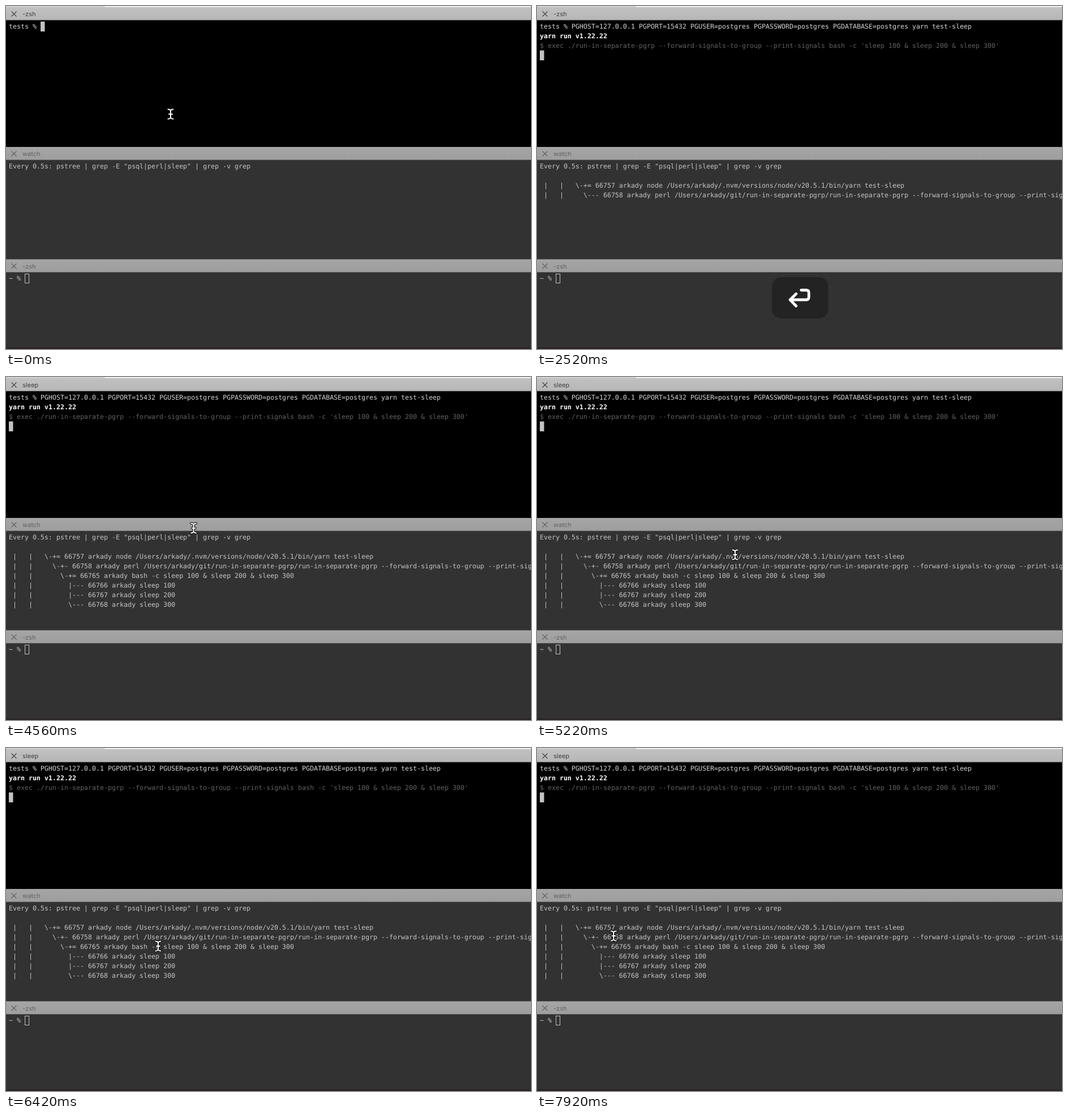
These frames come from a looping animation (925x606 px, 8 s). An HTML page:

```html
<!DOCTYPE html>
<html lang="en">
<head>
<meta charset="utf-8">
<title>Terminal panes</title>
<style>
  html, body { margin: 0; width: 100%; height: 100%; overflow: hidden; background: #323232; }
  svg { display: block; width: 925px; height: 606px; }
  text { white-space: pre; text-rendering: geometricPrecision; }
  .mono { font: 11.6px "DejaVu Sans Mono", "Noto Sans Mono", monospace; }
  .title { font: 11px Inter, Roboto, sans-serif; }
  .icon { fill: none; stroke: #fff; stroke-width: 4.8; stroke-linecap: round; stroke-linejoin: round; }
</style>
</head>
<body>
<svg viewBox="0 0 925 606">
  <defs>
    <linearGradient id="active" x2="0" y2="1"><stop stop-color="#c1c1c1"/><stop offset="1" stop-color="#b6b6b6"/></linearGradient>
    <linearGradient id="idle" x2="0" y2="1"><stop stop-color="#a5a5a5"/><stop offset="1" stop-color="#9e9e9e"/></linearGradient>
    <path id="beam" d="M-4.5-8.5Q-1-8.5 0-6Q1-8.5 4.5-8.5M0-6V6M-4.5 8.5Q-1 8.5 0 6Q1 8.5 4.5 8.5M-3 0H3"/>
  </defs>
  <rect width="925" height="606" fill="#323232"/>
  <rect width="925" height="2" fill="#f1f1f1"/>
  <rect width="174" height="2" fill="#d2d2d2"/>
  <rect y="25" width="925" height="224" fill="#000"/>
  <rect y="603" width="925" height="3" fill="#2b2528"/>
  <g id="bars"></g>
  <g id="rows"></g>
  <rect id="block" width="7.5" height="17.5" fill="#c2c2c2"/>
  <rect x="33.5" y="473.5" width="7" height="16" fill="none" stroke="#c2c2c2"/>
  <g id="up">
    <rect x="418.5" y="479" width="89" height="73" rx="16" fill="#232323"/>
    <path class="icon" d="M462.5 531.5V503M450.5 514.5L462.5 502.5L474.5 514.5"/>
  </g>
  <g id="enter">
    <rect x="414" y="479" width="99" height="73" rx="16" fill="#232323"/>
    <path class="icon" d="M465.5 502H474.5Q479 502 479 506.5V514Q479 519 474.5 519H446.5M456.5 508.5L446 519L456.5 530"/>
  </g>
  <g id="mouse" fill="none" stroke-linecap="round">
    <use href="#beam" stroke="#000" stroke-width="4"/>
    <use href="#beam" stroke="#fff" stroke-width="2"/>
  </g>
</svg>
<script>
const LOOP = 8000, STEP = 60, CELL = 6.984, LINE = 17;
// Moments of the session, in ms
const RECALL = 1440, RETURN = 2160, OUTPUT = 2340, SPAWN = 2460, TREE = 2940, FADE = 3060, GONE = 3540, MOVE = 3900;

const $ = id => document.getElementById(id);
const NS = "http://www.w3.org/2000/svg";

function add(parent, tag, attrs, text = "") {
  const el = document.createElementNS(NS, tag);
  for (const key in attrs) el.setAttribute(key, attrs[key]);
  el.textContent = text;
  return parent.appendChild(el);
}

function bar(y, name, fill, ink) {
  const g = $("bars");
  add(g, "rect", { y, width: 925, height: 23, fill: `url(#${fill})` });
  add(g, "path", { d: `M0 ${y + 23}H925`, stroke: "#555", "stroke-width": 0.7 });
  add(g, "path", { d: `M9.5 ${y + 7.5}l9 9m0-9l-9 9`, stroke: ink, "stroke-width": 1.1 });
  return add(g, "text", { x: 29, y: y + 16, class: "title", fill: ink }, name);
}

const title = bar(2, "-zsh", "active", "#414141");
bar(249, "watch", "idle", "#626262");
bar(447.5, "-zsh", "idle", "#626262");

// Each row is visible from one moment until another
const rows = [];
function row(top, n, text, from = 0, to = LOOP, fill = "#c4c4c4", weight = 400) {
  const el = add($("rows"), "text", { x: 5, y: top + n * LINE, class: "mono", fill }, text);
  el.style.fontWeight = weight;
  rows.push({ el, from, to });
}

const prompt = "tests % ";
const command = "PGHOST=127.0.0.1 PGPORT=15432 PGUSER=postgres PGPASSWORD=postgres PGDATABASE=postgres yarn test-sleep";
const user = "arkady";
const pipes = " |   |   ";
const perl = ` 66758 ${user} perl /Users/${user}/git/run-in-separate-pgrp/run-in-separate-pgrp --forward-signals-to-group --print-signals`;

row(40, 0, prompt, 0, LOOP, "#d6d6d6");
row(40, 0, " ".repeat(prompt.length) + command, RECALL, LOOP, "#d6d6d6");
row(40, 1, "yarn run v1.22.22", OUTPUT, LOOP, "#fff", 700);
row(40, 2, "$ exec ./run-in-separate-pgrp --forward-signals-to-group --print-signals bash -c 'sleep 100 & sleep 200 & sleep 300'", OUTPUT, LOOP, "#626262");

row(287, 0, 'Every 0.5s: pstree | grep -E "psql|perl|sleep" | grep -v grep');
row(287, 2, `${pipes}\\-+= 66757 ${user} node /Users/${user}/.nvm/versions/node/v20.5.1/bin/yarn test-sleep`, SPAWN);
row(287, 3, `${pipes}  \\---${perl}`, SPAWN, TREE);
row(287, 3, `${pipes}  \\-+-${perl}`, TREE);
row(287, 4, `${pipes}    \\-+= 66765 ${user} bash -c sleep 100 & sleep 200 & sleep 300`, TREE);
["|", "|", "\\"].forEach((joint, i) =>
  row(287, 5 + i, `${pipes}      ${joint}--- ${66766 + i} ${user} sleep ${100 * (i + 1)}`, TREE));

row(485, 0, "~ %");

// Pointer stops: time, x, y
const path = [
  [MOVE, 290, 191], [4500, 328, 262], [5220, 349, 314], [5820, 311, 340],
  [6420, 268, 350], [7200, 192, 347], [7920, 135, 332], [LOOP, 135, 332]
];

function pointer(t) {
  if (t < MOVE) return [290, 191];
  const i = path.findIndex((p, n) => n > 0 && t <= p[0]);
  const a = path[i - 1], b = path[i];
  const before = path[Math.max(i - 2, 0)], after = path[Math.min(i + 1, path.length - 1)];
  const u = (t - a[0]) / (b[0] - a[0]);
  const curve = k => {
    const m = (b[k] - before[k]) / 2, n = (after[k] - a[k]) / 2;
    return a[k] + u * (m + u * (3 * (b[k] - a[k]) - 2 * m - n + u * (2 * (a[k] - b[k]) + m + n)));
  };
  return [curve(1), curve(2)];
}

function caret(t) {
  if (t < RECALL) return [prompt.length, 0];
  if (t < RETURN) return [prompt.length + command.length, 0];
  return [0, t < OUTPUT ? 1 : 3];
}

const show = (el, on) => el.setAttribute("visibility", on ? "visible" : "hidden");

function draw(t) {
  for (const r of rows) show(r.el, t >= r.from && t < r.to);
  title.textContent = t < TREE ? "-zsh" : "sleep";

  const [col, line] = caret(t);
  $("block").setAttribute("x", 5 + col * CELL);
  $("block").setAttribute("y", 27.5 + line * LINE);

  show($("up"), t >= RECALL && t < RETURN);
  show($("enter"), t >= RETURN && t < GONE);
  $("enter").setAttribute("opacity", Math.min(1, Math.max(0, (GONE - t) / (GONE - FADE))));

  show($("mouse"), t < RECALL || t >= MOVE);
  $("mouse").setAttribute("transform", `translate(${pointer(t)})`);
}

const start = performance.now();
function tick() {
  const t = (performance.now() - start) % LOOP;
  draw(Math.floor(t / STEP) * STEP);
  requestAnimationFrame(tick);
}
tick();
</script>
</body>
</html>
```
